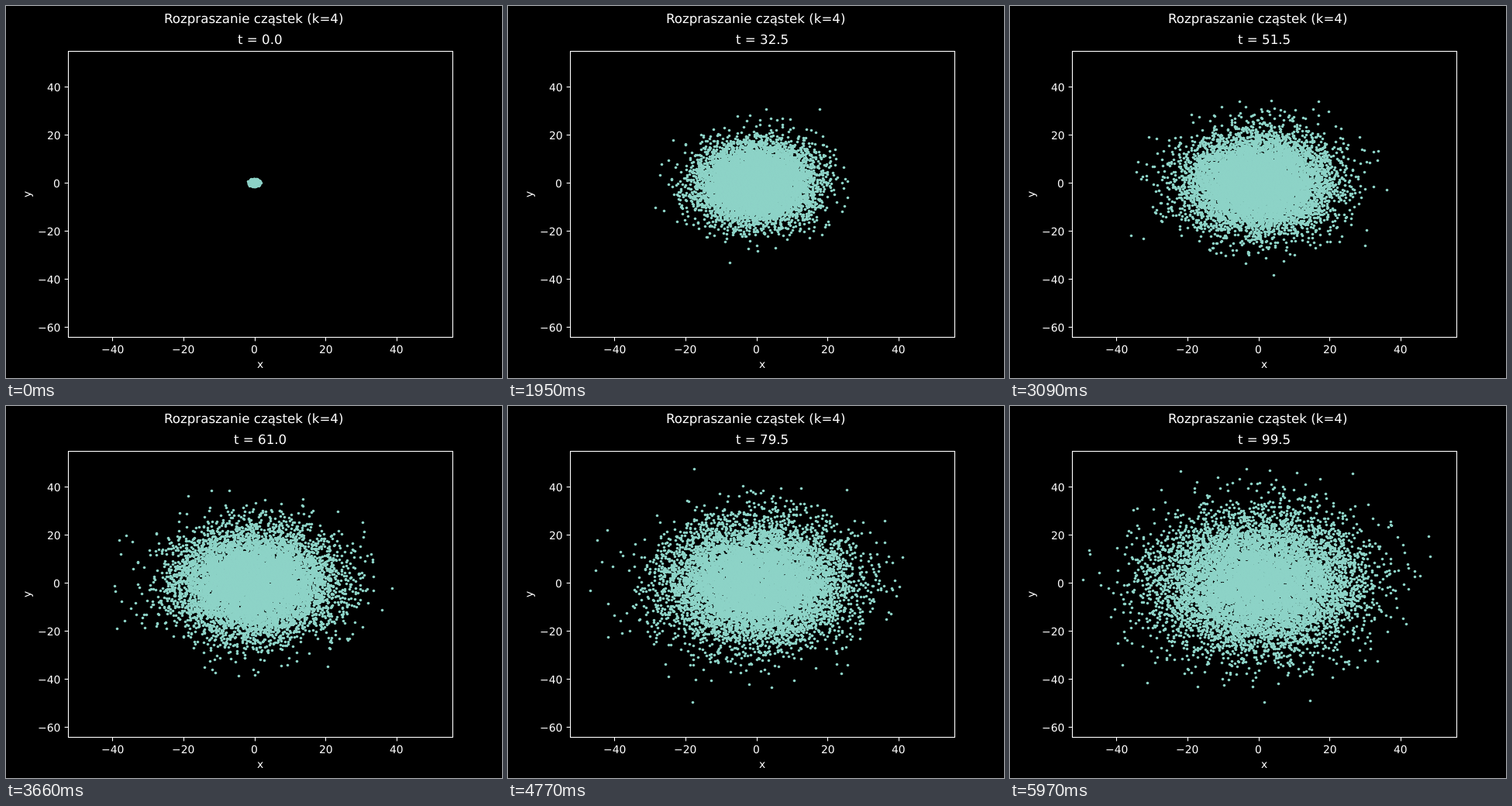
Recreate the animation shown at these times as an HTML page with a canvas. Size 640 px wide and 480 px high, loop 6 s.

```html
<!DOCTYPE html>
<html lang="pl">
<head>
<meta charset="utf-8">
<title>Rozpraszanie cząstek</title>
<style>
html, body { margin: 0; width: 100%; height: 100%; overflow: hidden; background: #000; }
canvas { display: block; }
</style>
</head>
<body>
<canvas id="stage" width="640" height="480"></canvas>
<script>
const ctx = document.getElementById('stage').getContext('2d');
const COUNT = 10000, STEPS = 200, STEP_MS = 30;
const BOX = { x: 80, y: 58, w: 496, h: 369 };
const LARGE = 16.667, SMALL = 13.889;
const toX = v => 320.8 + v * 4.5835;
const toY = v => 228.4 - v * 3.1;

let seed = 20417;
function rand() {
  seed = (seed + 0x6D2B79F5) | 0;
  let z = Math.imul(seed ^ (seed >>> 15), 1 | seed);
  z = (z + Math.imul(z ^ (z >>> 7), 61 | z)) ^ z;
  return ((z ^ (z >>> 14)) >>> 0) / 4294967296;
}

// Step length from a power law with k = 4: mostly short, rarely a long jump
const stepLength = () => Math.min(14, 0.94 * Math.pow(1 - rand(), -1 / 4));
const startRadius = () => Math.min(1.8, 0.47 * Math.sqrt(-2 * Math.log(1 - rand())));

const xs = new Float32Array(COUNT * STEPS);
const ys = new Float32Array(COUNT * STEPS);

function walk(i) {
  let x = 0, y = 0;
  for (let s = 0; s < STEPS; s++) {
    const len = s ? stepLength() : startRadius();
    const angle = rand() * Math.PI * 2;
    x += len * Math.cos(angle);
    y += len * Math.sin(angle);
    xs[s * COUNT + i] = toX(x);
    ys[s * COUNT + i] = toY(y);
  }
}
for (let i = 0; i < COUNT; i++) walk(i);

const dot = document.createElement('canvas');
dot.width = dot.height = 5;
const pen = dot.getContext('2d');
pen.fillStyle = '#8dd3c7';
pen.arc(2.5, 2.5, 1.8, 0, Math.PI * 2);
pen.fill();

// Text starts on a whole pixel; anchor is 0.5 for centred, 1 for right-aligned
function label(str, x, y, size, anchor = 0.5) {
  ctx.font = size + 'px "DejaVu Sans", sans-serif';
  ctx.textRendering = 'geometricPrecision';
  ctx.fillText(str, Math.round(x - ctx.measureText(str).width * anchor), y);
}

function line(x1, y1, x2, y2) {
  ctx.beginPath();
  ctx.moveTo(x1, y1);
  ctx.lineTo(x2, y2);
  ctx.stroke();
}

const signed = v => (v < 0 ? '\u2212' : '') + Math.abs(v);

function drawAxes() {
  ctx.strokeStyle = ctx.fillStyle = '#fff';
  ctx.lineWidth = 1.11;
  for (let v = -40; v <= 40; v += 20) {
    const x = Math.round(toX(v)) + 0.5;
    line(x, 427.5, x, 432.4);
    label(signed(v), toX(v), 448, SMALL);
  }
  for (let v = -60; v <= 40; v += 20) {
    const y = Math.round(toY(v));
    line(75.6, y + 0.5, 80.5, y + 0.5);
    label(signed(v), 70.3, y + 6, SMALL, 1);
  }
  ctx.strokeRect(BOX.x + 0.5, BOX.y + 0.5, BOX.w, BOX.h);
  label('x', 328, 467, SMALL);
  ctx.save();
  ctx.translate(32, 243);
  ctx.rotate(-Math.PI / 2);
  label('y', 0, 0, SMALL);
  ctx.restore();
  label('Rozpraszanie cząstek (k=4)', 320, 22, LARGE);
}

function draw(step) {
  ctx.fillStyle = '#000';
  ctx.fillRect(0, 0, 640, 480);
  ctx.save();
  ctx.beginPath();
  ctx.rect(BOX.x, BOX.y, BOX.w, BOX.h);
  ctx.clip();
  const end = (step + 1) * COUNT;
  for (let j = step * COUNT; j < end; j++)
    ctx.drawImage(dot, Math.floor(xs[j]) - 2, Math.floor(ys[j]) - 2);
  ctx.restore();
  drawAxes();
  label('t = ' + (step * 0.5).toFixed(1), 328, 49, LARGE);
}

const start = performance.now();
let shown = -1;
function tick(now) {
  const step = Math.floor(Math.max(0, now - start) / STEP_MS) % STEPS;
  if (step !== shown) draw(shown = step);
  requestAnimationFrame(tick);
}
draw(shown = 0);
requestAnimationFrame(tick);
</script>
</body>
</html>
```
